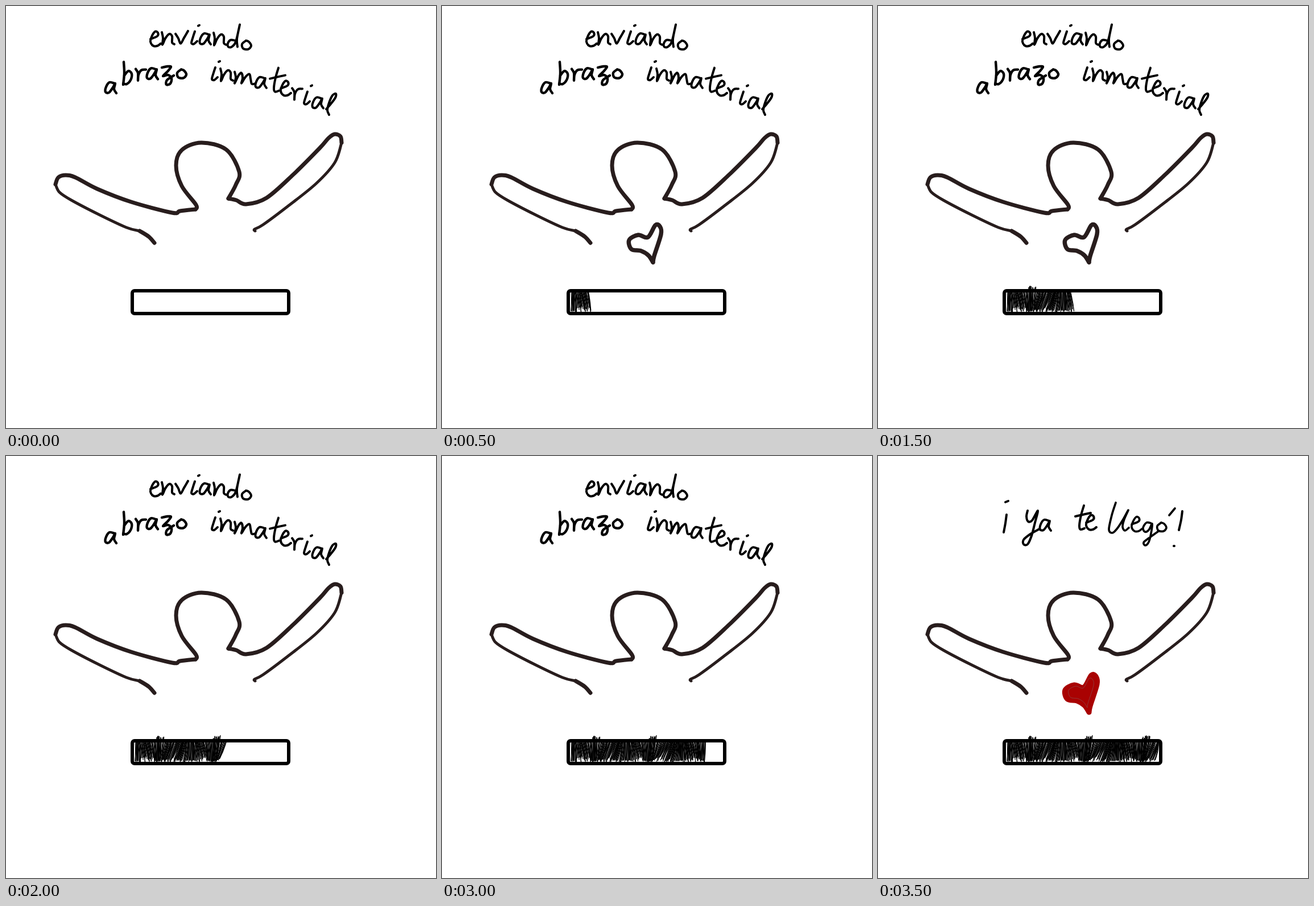
Write an HTML page that moves like this. It is 756 by 741 pixels and loops after 4.5 s.

```html
<!DOCTYPE html>
<html lang="es">
<head>
<meta charset="utf-8">
<title>Abrazo inmaterial</title>
<style>
  html, body { margin: 0; width: 100%; height: 100%; overflow: hidden; background: #fff; }
  svg { display: block; width: 100%; height: 100%; }
  path { fill: none; stroke-linecap: round; stroke-linejoin: round; }
</style>
</head>
<body>
<svg viewBox="0 0 756 741" xmlns="http://www.w3.org/2000/svg">
  <g id="sending" role="img" aria-label="enviando abrazo inmaterial"></g>
  <g id="arrived" role="img" aria-label="¡Ya te llegó!"></g>
  <g id="body"></g>
  <g id="heart"></g>
  <g id="redHeart"></g>
  <g id="hatching"></g>
  <rect x="222" y="500" width="275" height="40" rx="4" fill="none" stroke="#000" stroke-width="6"/>
</svg>
<script>
const $ = id => document.getElementById(id);
const INK = '#281d1d', RED = '#a90202';

function addPath(parent, d, width, color = '#000') {
  const p = document.createElementNS('http://www.w3.org/2000/svg', 'path');
  p.setAttribute('d', d);
  p.setAttribute('stroke-width', width);
  p.setAttribute('stroke', color);
  parent.append(p);
  return p;
}

// Smooth curve through "x,y x,y ..." points, moved by dx, dy
function curve(text, dx = 0, dy = 0) {
  const pts = text.split(' ').map(s => {
    const [x, y] = s.split(',').map(Number);
    return [x + dx, y + dy];
  });
  const at = i => pts[Math.max(0, Math.min(pts.length - 1, i))];
  let d = 'M' + pts[0];
  for (let i = 0; i < pts.length - 1; i++) {
    const [a, b, c, e] = [at(i - 1), at(i), at(i + 1), at(i + 2)];
    const c1 = b.map((v, k) => v + (c[k] - a[k]) / 6);
    const c2 = c.map((v, k) => v - (e[k] - b[k]) / 6);
    d += `C${c1} ${c2} ${c}`;
  }
  return d;
}

// Pen strokes of each letter from its left end on the baseline, then its advance
const round = '7,-15 0,-9 2,-1 11,0 16,-6 12,-13 7,-15';
const letters = {
  a: ['16,-17 7,-19 1,-11 0,-2 6,-1 13,-10 17,-17 15,-7 19,0', 24],
  b: ['8,-40 9,-20 7,0|9,-16 16,-24 22,-19 20,-8 13,-1 7,-2', 29],
  d: ['14,-11 6,-12 1,-6 2,0 8,0 15,-9 22,-39 17,-14 18,0', 26],
  e: ['1,-12 13,-17 14,-23 9,-25 3,-16 1,-7 6,0 13,0 19,-4', 21],
  g: ['14,-14 6,-15 0,-6 3,1 10,-2 16,-13 14,4 10,19 4,25 1,20 9,13 27,0', 25],
  i: ['7,-22 4,-13 1,-2 5,0 11,-5|13,-32 15,-33', 16],
  l: ['0,-10 8,-19 16,-30 17,-37 11,-34 5,-21 2,-8 5,0', 20],
  m: ['1,-20 3,-10 1,0 8,-14 13,-18 15,-9 13,0 20,-11 27,-16 29,-8 31,1 36,1', 38],
  n: ['0,-22 2,-12 1,0 6,-11 13,-19 18,-15 18,-4 22,-1', 24],
  o: [round, 20],
  ó: [round + '|31,-40 26,-34 21,-28', 30],
  r: ['0,-20 4,-13 4,0 5,-10 10,-18 18,-19', 20],
  t: ['16,-42 11,-25 8,-7 10,0 17,-2|1,-23 14,-26 28,-29', 19],
  v: ['0,-18 5,-10 9,-1 15,-11 22,-23', 27],
  z: ['2,-19 12,-21 18,-20 11,-11 4,-4 13,-6 19,0 17,9 10,11 11,3 23,-5', 29],
  Y: ['7,-35 5,-25 8,-16 15,-18 25,-35 20,-14 14,9 7,24 0,24 0,16 12,6 28,-3', 29],
  ll: ['12,-50 5,-28 0,-3 6,3 14,-4 24,-19 34,-37 27,-21 24,-8 28,-1 35,-6', 39],
  '¡': ['3,-53 8,-55|5,-31 3,-16 0,0', 20],
  '!': ['15,-35 13,-20 9,-2|0,26 1,26', 20]
};

// Writes a word from x; baseline(u) gives the height u pixels along it
function write(parent, word, x, baseline, width = 4) {
  let u = 0;
  for (const key of word.match(/ll|./g)) {
    const [strokes, advance] = letters[key];
    for (const s of strokes.split('|')) addPath(parent, curve(s, x + u, baseline(u)), width);
    u += advance;
  }
}

const level = y => () => y;
write($('sending'), 'enviando', 253, u => 70 - 0.11 * u + 0.0009 * u * u);
write($('sending'), 'abrazo', 175, u => 126 + 27 * Math.exp(-u / 30), 4.4);
write($('sending'), 'inmaterial', 361, u => 130 + 0.1 * u + 0.001 * u * u);
write($('arrived'), '¡', 221, level(134));
write($('arrived'), 'Ya', 256, level(131));
write($('arrived'), 'te', 346, level(129));
write($('arrived'), 'llegó', 406, level(132), 3.7);
write($('arrived'), '!', 520, level(132));

// Body outline: thinner under the arms
const limbs = {
  leftUnder: '235,395 212,389 165,367 115,341 94,327 87,313',
  leftHand: '261,416 251,405 235,395',
  leftTop: '87,313 92,301 105,297 122,301 160,321 220,344 292,363 306,360 333,357',
  head: '333,357 334,349 309,316 299,280 309,253 343,240 387,252 410,291 404,314 391,338',
  rightTop: '391,338 405,341 422,348 458,337 505,296 552,249 567,232 578,225 588,229 590,240',
  rightUnder: '590,240 578,275 545,312 495,352 452,384 437,392 438,395'
};
for (const [name, pts] of Object.entries(limbs)) {
  addPath($('body'), curve(pts), name.endsWith('Under') ? 5 : 7, INK);
}

const heartLine = curve('371,450 373,439 385,401 383,387 375,385 362,406 345,402 329,411 333,427 350,430 363,438 371,450');
addPath($('heart'), heartLine, 7.5, INK);
addPath($('redHeart'), heartLine, 9, RED).style.fill = RED;
addPath($('redHeart'), heartLine, 1, '#8d4a4a')
  .setAttribute('transform', 'translate(357 412) scale(.78) translate(-357 -412)');

// Pen hatching: the lean swings along the bar, and each swing leaves gaps at the bottom
let seed = 11;
const rand = () => (seed = seed * 16807 % 2147483647) / 2147483647;

const hatches = [];
for (let x = 227; x < 493; x += 1.05) {
  const swing = Math.sin((x - 272) / 95 * 2 * Math.PI);
  const lean = 3 + 9 * swing + (rand() - 0.5) * 3;
  const topX = Math.min(493, x + lean / 2);
  const inTuft = Math.abs((topX - 220) % 100 - 51) < 7;
  const top = inTuft ? 491 + rand() * 7 : 500 + rand() * 3;
  const bottom = 537 - rand() * (3 + 8 * swing * swing);
  const d = `M${topX} ${top}Q${x + 1} 518 ${x - lean / 2} ${bottom}`;
  hatches.push({ x, path: addPath($('hatching'), d, 1 + rand() * 0.8) });
}

const STEP = 500, LOOP = 4500, LAST = 7;
const show = (el, on) => { el.style.display = on ? '' : 'none'; };

function draw(ms) {
  const step = Math.min(LAST, Math.floor(ms % LOOP / STEP));
  const done = step === LAST;
  const end = 220 + 40.5 * step;
  show($('sending'), !done);
  show($('arrived'), done);
  show($('redHeart'), done);
  show($('heart'), !done && step % 2 === 1);
  hatches.forEach(h => show(h.path, h.x < end));
}

function tick() {
  draw(performance.now());
  requestAnimationFrame(tick);
}
tick();
</script>
</body>
</html>
```
